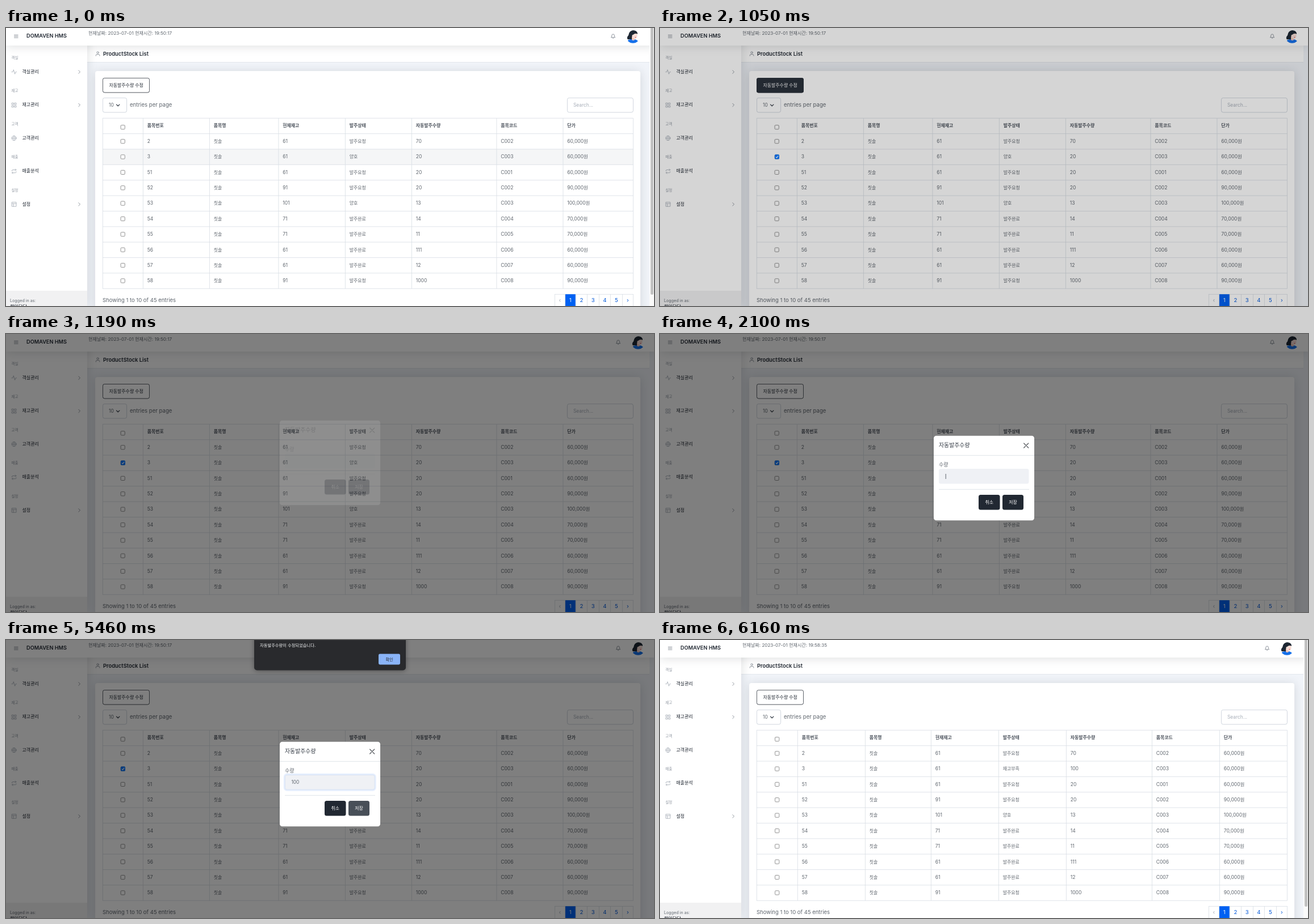
Animation, 1141 px wide and 491 px high, one loop 8000 ms. Source, as an HTML page:

```html
<!DOCTYPE html>
<html lang="ko">
<head>
<meta charset="utf-8">
<title>Stock list</title>
<style>
html, body { margin: 0; width: 100%; height: 100%; overflow: hidden; background: #f1f4f9; }
#stage { position: relative; width: 1141px; height: 491px; overflow: hidden; background: #f1f4f9; }
#stage > * { position: absolute; }
svg { left: 0; top: 0; width: 1141px; height: 491px; overflow: hidden; }
text { font-family: Inter, "Noto Sans CJK KR", "Noto Sans CJK JP", sans-serif; white-space: pre; }

.head { left: 143px; top: 31px; width: 989.5px; height: 28.5px; background: #fff; border-bottom: 1px solid #e3e7ec; }
.card, .side, .top { background: #fff; box-shadow: 0 1.4px 16.7px rgba(33, 40, 50, .15); }
.card { left: 157px; top: 76px; width: 960px; height: 440px; border-radius: 4px; }
.side { left: 0; top: 0; width: 143px; height: 491px; }
.foot { left: 0; top: 464px; width: 143px; height: 27px; background: #f1f1f2; }
.top { left: 0; top: 0; width: 1141px; height: 31px; }
.bar { left: 1132.5px; top: 0; width: 8.5px; height: 491px; background: #fafafa; }
.bar i { position: absolute; left: 2px; top: 0; width: 5px; height: 471px; border-radius: 0 0 3px 3px; background: #c1c1c1; }
.shade { inset: 0; background: #000; }

.line { fill: none; stroke: #a7aeb8; stroke-width: .85; stroke-linecap: round; stroke-linejoin: round; }
.dark { stroke: #7d848d; }
.grid { fill: none; stroke: #d9dee5; stroke-width: .8; }
.field { fill: #fff; stroke: #c5ccd6; stroke-width: .8; }
.box { fill: #fff; stroke: #767676; stroke-width: .8; }

.bar, .shift, .hover, .tick, .tick rect, .fill, .label, .before, .after, .shade,
.modal, .ring, .caret, .typed, .last, .save, .alert { animation: 8s step-end infinite; }
.bar { animation-name: bar; }
.shift { animation-name: shift; }
.hover { animation-name: hover; }
.tick { animation-name: tick; }
.tick rect { animation-name: press; }
.fill { animation-name: fill; }
.label { animation-name: label; }
.before { animation-name: before; }
.after { animation-name: after; }
.shade { animation-name: shade; }
.modal { animation-name: modal; }
.ring { animation-name: ring; }
.caret { animation-name: caret; }
.typed { animation-name: typed; }
.last { animation-name: last; }
.save { animation-name: save; }
.alert { animation-name: alert; }
.alert > .panel { filter: drop-shadow(0 1px 4px rgba(0, 0, 0, .35)); }

@keyframes bar { 0% { opacity: 1 } 13.125% { opacity: 0 } 75.25%, 100% { opacity: 1 } }
@keyframes shift { 0% { transform: none } 13.125% { transform: translateX(9px) } 75.25%, 100% { transform: none } }
@keyframes hover { 0% { opacity: 1 } 13.125%, 100% { opacity: 0 } }
@keyframes tick { 0% { opacity: 0 } 1.75% { opacity: .6 } 2.625% { opacity: 1 } 76.125%, 100% { opacity: 0 } }
@keyframes press { 0% { fill: #005cc8 } 4.375%, 100% { fill: #0075ff } }
@keyframes fill { 0% { opacity: 0 } 8.75% { opacity: .5 } 9.625% { opacity: 1 } 14% { opacity: .5 } 14.875%, 100% { opacity: 0 } }
@keyframes label { 0% { fill: #212832 } 8.75% { fill: #fff } 14.875%, 100% { fill: #212832 } }
@keyframes before { 0% { opacity: 1 } 76.125%, 100% { opacity: 0 } }
@keyframes after { 0% { opacity: 0 } 76.125%, 100% { opacity: 1 } }
@keyframes shade {
  0% { opacity: 0 } 13.125% { opacity: .165 } 14% { opacity: .4 } 14.875% { opacity: .5 }
  73.5% { opacity: .33 } 74.375% { opacity: .1 } 75.25%, 100% { opacity: 0 }
}
@keyframes modal {
  0% { opacity: 0; transform: none }
  14.875% { opacity: .12; transform: translateY(-27px) }
  15.75% { opacity: .58; transform: translateY(-17px) }
  16.625% { opacity: 1; transform: translateY(-8.6px) }
  17.5% { opacity: 1; transform: translateY(-2.7px) }
  18.375% { opacity: 1; transform: none }
  70% { opacity: .55; transform: translateY(-10px) }
  70.875% { opacity: .1; transform: translateY(-20px) }
  71.75%, 100% { opacity: 0; transform: none }
}
@keyframes ring { 0% { opacity: 0 } 27.125% { opacity: .5 } 28% { opacity: 1 } 56.875% { opacity: .7 } 57.75%, 100% { opacity: .4 } }
@keyframes caret {
  0% { opacity: 0; transform: none }
  26.25% { opacity: 1; transform: none }
  33.25% { opacity: 0; transform: none }
  39.375% { opacity: 1; transform: none }
  41.125% { opacity: 1; transform: translateX(8.5px) }
  42.875% { opacity: 1; transform: translateX(14.2px) }
  49.875%, 100% { opacity: 0; transform: none }
}
@keyframes typed { 0% { visibility: hidden } 41.125%, 100% { visibility: visible } }
@keyframes last { 0% { visibility: hidden } 42.875%, 100% { visibility: visible } }
@keyframes save { 0% { fill: #212832 } 55.125% { fill: #363d47 } 56% { fill: #424851 } 57.75%, 100% { fill: #484f58 } }
@keyframes alert {
  0% { opacity: 0 } 58.625% { opacity: .35 } 59.5% { opacity: .8 } 60.375% { opacity: 1 }
  69.125% { opacity: .4 } 70%, 100% { opacity: 0 }
}
</style>
</head>
<body>
<div id="stage">
  <div class="head"></div>
  <div class="card"></div>
  <div class="side"></div>
  <div class="foot"></div>
  <div class="top"></div>
  <div class="bar"><i></i></div>
  <svg id="page">
    <defs><clipPath id="round"><circle cx="1104" cy="14.7" r="12"/></clipPath></defs>
    <path class="line dark" d="M14.5 12.3h6.6M14.5 14.7h6.6M14.5 17.1h6.6"/>
    <path class="line" d="M10 77.6h1.9l1.4-3.9 2.3 7.6 1.4-3.7h1.4"/>
    <path class="line" d="M10.5 132.4h2.8v2.8h-2.8zM15.2 132.4h2.8v2.8h-2.8zM10.5 137.1h2.8v2.8h-2.8zM15.2 137.1h2.8v2.8h-2.8z"/>
    <path class="line" d="M10.2 194.5h8M14.2 190.5c2.2 2.4 2.2 5.6 0 8c-2.2-2.4-2.2-5.6 0-8"/>
    <circle class="line" cx="14.2" cy="194.5" r="4"/>
    <path class="line" d="M16.2 248.8l1.7 1.7-1.7 1.7M10.5 252.6v-.6q0-1.5 1.5-1.5h5.9M12.2 257.4l-1.7-1.7 1.7-1.7M17.9 253.6v.6q0 1.5-1.5 1.5h-5.9"/>
    <path class="line" d="M10.6 307.7h7.4v7.4h-7.4zM10.6 310.2h7.4M13.1 310.2v4.9"/>
    <path class="line dark" d="M127.8 74.9l2.7 2.7-2.7 2.7M127.8 133.3l2.7 2.7-2.7 2.7M127.8 308.6l2.7 2.7-2.7 2.7"/>
    <circle class="line dark" cx="161.6" cy="43.4" r="1.7"/>
    <path class="line dark" d="M158.3 49.2v-.8q0-1.8 1.8-1.8h3q1.8 0 1.8 1.8v.8"/>
    <g class="shift">
      <path class="line dark" d="M1065.7 16.4q1.1-.9 1.1-3.3a2.2 2.2 0 0 1 4.4 0q0 2.4 1.1 3.3zM1068.3 18h1.4"/>
      <g clip-path="url(#round)">
        <path d="M1094 19q-1-3 2-6q1-8 8-9q7 0 8 6l-4 4-3 6h-8q-2 1-3-1z" fill="#1d2733"/>
        <path d="M1092 27q1-6 8-7h7q6 1 8 7z" fill="#1570ea"/>
        <path d="M1102 15h5v6q-3 2-5 0z" fill="#eec5ba"/>
        <ellipse cx="1107" cy="13.5" rx="4.6" ry="5.6" fill="#f8ded6"/>
        <path d="M1100 13q0-8 6-8q5 0 6 5q-5-1-8 2z" fill="#1d2733"/>
        <circle cx="1108.4" cy="16.4" r=".9" fill="#d8606a"/>
      </g>
    </g>
    <rect class="field" x="170.4" y="88.4" width="82.2" height="25.6" rx="3.3" style="stroke:#212832"/>
    <rect class="fill" x="170" y="88" width="83" height="26.4" rx="3.5" fill="#2a313b"/>
    <rect class="field" x="170.4" y="123.4" width="42.2" height="25.6" rx="3.3"/>
    <path class="line" d="M194.5 135.1l2.7 2.7 2.7-2.7" style="stroke:#363d47;stroke-width:1.3"/>
    <rect class="field" x="988.4" y="123.4" width="116" height="25.6" rx="3.3"/>
    <rect class="hover" x="170.4" y="213.9" width="933.8" height="27.4" fill="#f5f6f7"/>
  </svg>
  <div class="shade"></div>
  <svg class="modal" id="modal">
    <rect x="482" y="179.8" width="177" height="149.4" rx="4.5" fill="#fff"/>
    <path class="grid" d="M482 214.4h177M491 274.4h159"/>
    <path class="line" d="M640.7 193l8 8M648.7 193l-8 8" style="stroke:#5a5d62;stroke-width:1.3"/>
    <rect x="491" y="238" width="158.5" height="26.5" rx="3.5" fill="#eff1f5"/>
    <g class="ring" fill="none">
      <rect x="490" y="237" width="160.5" height="28.5" rx="4.5" stroke="#0061f2" stroke-opacity=".25" stroke-width="2.4"/>
      <rect x="491.4" y="238.4" width="157.7" height="25.7" rx="3.2" stroke="#a0bfec" stroke-width=".7"/>
    </g>
    <rect class="caret" x="502.7" y="247" width=".9" height="9" fill="#4d545e"/>
    <rect x="561" y="284" width="37.5" height="26.5" rx="3.5" fill="#212832"/>
    <rect class="save" x="603" y="284" width="37" height="26.5" rx="3.5"/>
  </svg>
  <svg class="alert" id="alert">
    <rect class="panel" x="437" y="-10" width="267" height="63.5" rx="5" fill="#292a2d"/>
    <rect x="656" y="24.5" width="38" height="19" rx="2.4" fill="#8ab4f8"/>
  </svg>
</div>
<script>
const ink = '#212832', gray = '#60676f', pale = '#a7aeb8', blue = '#0057d9';
const $ = id => document.getElementById(id);
const text = (x, y, s, size, fill = gray, weight = 400, extra = '') =>
  `<text x="${x}" y="${y}" font-size="${size}" fill="${fill}" font-weight="${weight}" ${extra}>${s}</text>`;
const mid = 'text-anchor="middle"';

const heads = ['품목번호', '품목명', '현재재고', '발주상태', '자동발주수량', '품목코드', '단가'];
const states = ['발주요청', '양호', '발주완료', '재고부족'];
// number, stock, state, order quantity, code
const stock = [
  [2, 61, 0, 70, 2], [3, 61, 1, 20, 3], [51, 61, 0, 20, 1], [52, 91, 0, 20, 2], [53, 101, 1, 13, 3],
  [54, 71, 2, 14, 4], [55, 71, 2, 11, 5], [56, 61, 2, 111, 6], [57, 61, 2, 12, 7], [58, 91, 0, 1000, 8]
];
const top0 = 159.3, step = 27.36;

function table(cls, cols, rows, clock) {
  const boxX = (170 + cols[0]) / 2 - 3.4;
  const check = y => `<rect class="box" x="${boxX}" y="${y - 3.6}" width="7.2" height="7.2" rx="1.4"/>`;
  let lines = '';
  for (let i = 0; i < 12; i++) lines += `M170 ${top0 + i * step}H1104.5`;
  for (const x of [170, ...cols, 1104]) lines += `M${x + .4} ${top0}V${top0 + 11 * step}`;
  let out = `<path class="grid" d="${lines}"/>` + check(175.2);
  heads.forEach((h, i) => out += text(cols[i] + 7.8, 175.4, h, 7.9, '#4a515b', 700));
  rows.forEach(([no, count, state, qty, code], r) => {
    const y = 203 + r * step;
    const cells = [no, count && '칫솔', count, states[state], qty, 'C00' + code, Math.floor(count / 10) * 10 + ',000원'];
    out += check(y - 2.8);
    cells.forEach((c, i) => out += text(cols[i] + 7.8, y, c, /^[가-힣]/.test(c) ? 7.9 : 8.5));
  });
  out += text(145, 12, `현재날짜: 2023-07-01 현재시간: ${clock}`, 8.1);
  return `<g class="${cls}">${out}</g>`;
}

let page = text(36, 17.3, 'DOMAVEN HMS', 9.2, ink, 600)
  + text(171, 48.5, 'ProductStock List', 9.4, ink, 600)
  + text(7, 483.6, 'Logged in as:', 7.2)
  + text(7, 495, '책임담당', 8.2, ink, 500)
  + text(181.4, 103.6, '자동발주수량 수정', 7.95, ink, 500, 'class="label"')
  + text(181, 139.2, '10', 8.4)
  + text(218, 139.2, 'entries per page', 9.6)
  + text(999, 139.2, 'Search...', 8.4, pale)
  + text(170, 484, 'Showing 1 to 10 of 45 entries', 9.5);

['객실', '재고', '고객', '매출', '설정'].forEach((s, i) => page += text(9.5, 54.7 + i * 58.45, s, 6.4, '#8f96a0', 500));
['객실관리', '재고관리', '고객관리', '매출분석', '설정'].forEach((s, i) =>
  page += text(28.5, 80 + i * 58.45, s, 8, ink, 500));

const edges = [966, 984, 1003, 1023, 1044, 1064, 1085, 1104];
page += `<path class="grid" d="M966 470.4H1104.5${edges.map(x => `M${x + .4} 470V491`).join('')}"/>`
  + '<rect x="984.9" y="470.2" width="17.8" height="22" fill="#0061f2"/>';
['‹', '1', '2', '3', '4', '5', '›'].forEach((s, i) =>
  page += text((edges[i] + edges[i + 1]) / 2 + .3, 484, s, 9.5, i == 1 ? '#fff' : i ? blue : pale, 400, mid));

const updated = stock.map(row => row[0] == 3 ? [3, 61, 3, 100, 3] : row);
page += table('before', [241, 358, 479.5, 597, 714, 863.5, 980.5], stock, '19:50:17')
  + table('after', [242, 361, 477, 596, 715, 866, 985], updated, '19:58:35')
  + `<g class="tick"><rect x="202" y="223.5" width="8" height="8" rx="1.5"/>
     <path d="M203.9 227.700l1.6 1.6 2.8-3.7" fill="none" stroke="#fff" stroke-width="1.2"/></g>`;
$('page').insertAdjacentHTML('beforeend', page);

$('modal').insertAdjacentHTML('beforeend',
  text(491, 199.6, '자동발주수량', 9.9, '#363d47', 500)
  + text(491, 233.7, '수량', 9)
  + text(502.4, 254.2, '10<tspan class="last">0</tspan>', 8.4, gray, 400, 'class="typed"')
  + text(579.7, 299.7, '취소', 7.9, '#fff', 500, mid)
  + text(621.5, 299.7, '저장', 7.9, '#fff', 500, mid));

$('alert').insertAdjacentHTML('beforeend',
  text(447, 11.6, '자동발주수량이 수정되었습니다.', 7.3, '#f1f3f4', 500)
  + text(675, 36.6, '확인', 7, '#202124', 500, mid));
</script>
</body>
</html>
```
